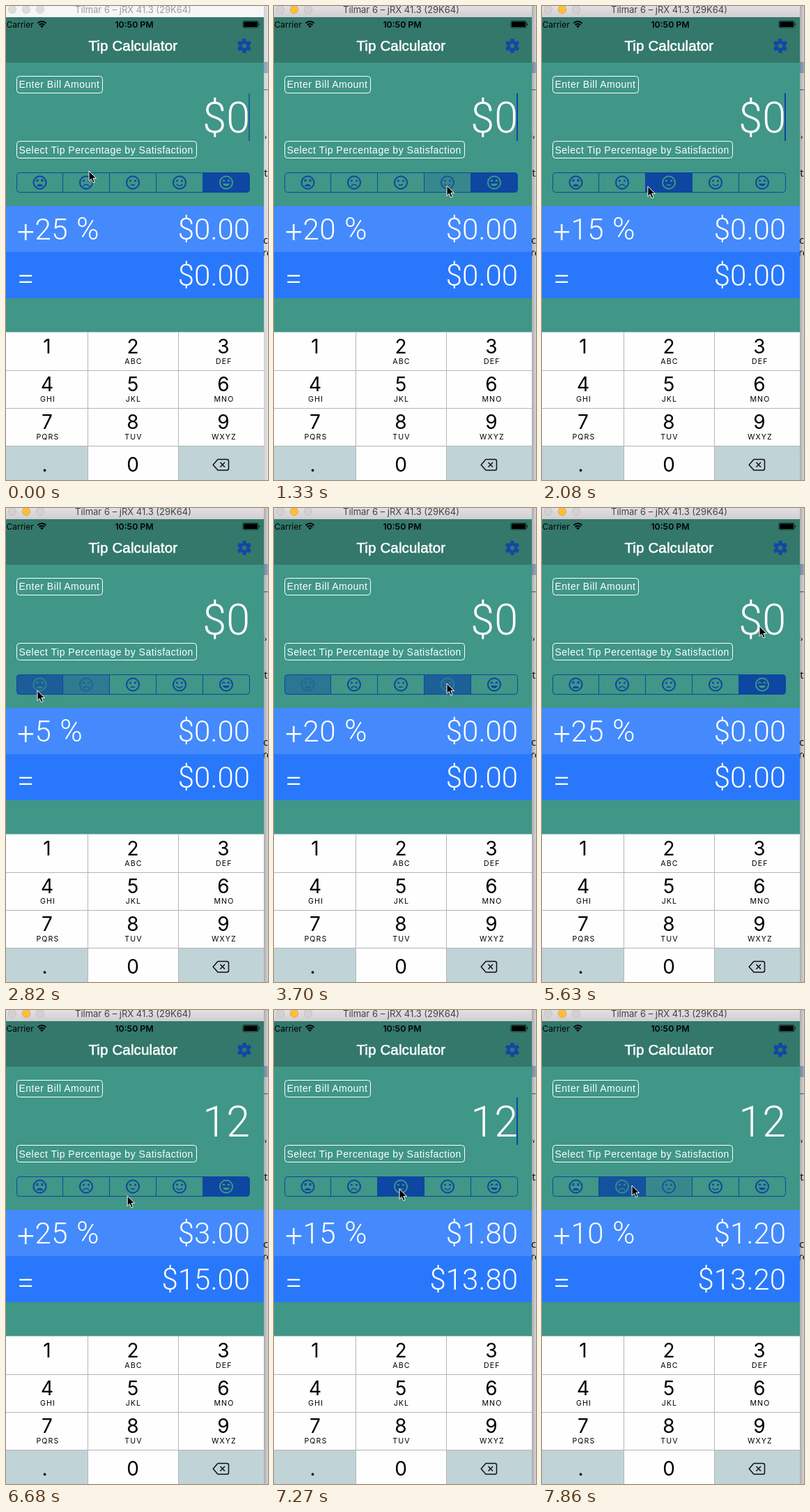
Write an HTML page that moves like this. It is 376 by 678 pixels and loops after 8000 ms.

```html
<!DOCTYPE html>
<html lang="en">
<head>
<meta charset="utf-8">
<title>Tip Calculator</title>
<style>
html, body { margin: 0; width: 100%; height: 100%; overflow: hidden; background: #fff; }
svg { display: block; width: 376px; height: 678px; }
text { white-space: pre; }
.ui { font-family: Inter, Roboto, sans-serif; }
.label { font: 14px "Liberation Sans", Arial, sans-serif; letter-spacing: .5px; fill: #fff; }
.light { font-family: Roboto, "Liberation Sans", sans-serif; font-weight: 300; fill: #fff; }
.mid { text-anchor: middle; }
.end { text-anchor: end; }
.row { font-size: 42px; }
.page { font: 15px "Open Sans", "Noto Sans", sans-serif; fill: #111; }
.sub { font-size: 10.6px; letter-spacing: 1.1px; }
</style>
</head>
<body>
<svg viewBox="0 0 376 678" xmlns="http://www.w3.org/2000/svg">
  <defs>
    <linearGradient id="bar" x2="0" y2="1">
      <stop stop-color="#e2e0e2"/><stop offset="1" stop-color="#d0ced0"/>
    </linearGradient>
    <linearGradient id="shade">
      <stop stop-color="#000" stop-opacity=".3"/><stop offset="1" stop-color="#000" stop-opacity=".12"/>
    </linearGradient>
  </defs>

  <!-- page behind the window -->
  <path fill="#f4f2f4" d="M369 0h7v678h-7z"/>
  <path fill="#a9bdd8" d="M369 80h7v16h-7z"/>
  <path fill="#7d97bb" d="M369 119h7v1.500h-7z"/>
  <g class="page">
    <text x="364" y="188">s,</text><text x="362" y="244">at</text>
    <text x="369" y="340">co</text><text x="368" y="358">re</text>
  </g>
  <path id="shadow" fill="url(#shade)" d="M370 0h6v678h-6z"/>

  <!-- title bar -->
  <path id="titleBar" d="M0 0h370v16H0z"/>
  <g id="lights" stroke-width=".8">
    <circle cx="9" cy="5" r="5.700"/><circle cx="29" cy="5" r="5.700"/><circle cx="49" cy="5" r="5.700"/>
  </g>
  <text id="title" class="ui mid" x="182.500" y="10" font-size="13">Tilmar 6 – jRX 41.3 (29K64)</text>

  <!-- app -->
  <path fill="#409687" d="M0 16h370v662H0z"/>
  <path fill="#33786b" d="M0 16h370v64.500H0z"/>
  <path fill="#2f6f64" d="M0 80h370v.7H0z"/>
  <text class="ui" x="0.500" y="31" font-size="12">Carrier</text>
  <g fill="none" stroke="#000" stroke-width="1.900">
    <path d="M45.500 24.700Q51.500 19.500 57.500 24.700M47.700 27.200Q51.500 24 55.300 27.200"/>
    <path fill="#000" stroke="none" d="M49 28.600Q51.500 26.800 54 28.600L51.500 31.200z"/>
  </g>
  <text class="ui mid" x="184" y="31" font-size="12.300" font-weight="600">10:50 PM</text>
  <rect x="339.800" y="21.500" width="22.400" height="9.500" rx="2" fill="none" stroke="#000" stroke-width=".6"/>
  <rect x="341" y="22.500" width="20" height="7.500" rx="1"/>
  <path d="M363 24.500q2 1.700 0 3.500z"/>
  <text class="mid" x="182.300" y="64" fill="#fff" stroke="#fff" stroke-width=".6" font-size="20.500" letter-spacing=".15" font-family="'Liberation Sans', Arial, sans-serif">Tip Calculator</text>
  <g id="gear" transform="translate(342 57)" fill="#1148a5"></g>

  <g fill="none" stroke="#fff">
    <rect x="15.500" y="100.500" width="123" height="24" rx="4"/>
    <rect x="15.500" y="193.500" width="258" height="24" rx="4"/>
  </g>
  <text class="label" x="18.500" y="117">Enter Bill Amount</text>
  <text class="label" x="18.500" y="210.500">Select Tip Percentage by Satisfaction</text>
  <text id="bill" class="light end" x="350" y="181" font-size="61"></text>
  <path id="caret" fill="#0d47a1" d="M348 125h2v68h-2z"/>

  <g id="segments"></g>
  <rect x="15.500" y="238.500" width="334" height="28" rx="4" fill="none" stroke="#0d47a1"/>

  <path fill="#448afc" d="M0 286h370v66H0z"/>
  <path fill="#2978fb" d="M0 352h370v66H0z"/>
  <g class="light row">
    <text x="16" y="338" font-size="44">+</text>
    <text x="41.500" y="334" letter-spacing=".4"><tspan id="percent"></tspan><tspan dx="1.500" font-size="44">%</tspan></text>
    <text id="tip" class="end" x="350" y="334"></text>
    <text x="16" y="405" font-size="44">=</text>
    <text id="total" class="end" x="350" y="400"></text>
  </g>

  <!-- keypad -->
  <path fill="#fefefe" d="M0 466.500h370V678H0z"/>
  <path fill="#c0d3d7" d="M0 629h117v49H0zM248 629h122v49H248z"/>
  <path fill="none" stroke="#b3b6b7" d="M0 521.500H370M0 575.500H370M0 629.500H370M117.500 467V678M247.500 467V678"/>
  <g id="keys" class="ui mid"></g>
  <g fill="none" stroke="#111" stroke-width="1.500">
    <path stroke-linejoin="round" d="M304 648.500h13q2.500 0 2.500 2.500v10.500q0 2.500-2.500 2.500h-13l-6.800-7.800z"/>
    <path d="M307.500 652.800l6.500 6.800m0-6.800l-6.500 6.800"/>
  </g>

  <path id="cursor" stroke="#fff" stroke-width="1" d="M0 0V14.500L3.300 11.400L5.600 16.800L8.200 15.700L5.900 10.400H10.500Z"/>
</svg>

<script>
const $ = id => document.getElementById(id);
const LOOP = 8000, STEP = 148.3, LAST = 53;
const DARK = [13, 71, 161], TEAL = [64, 150, 135];

// time, chosen segment, fade length
const picks = [
  [-999, 4], [1290, 3], [1780, 2], [2225, 1], [2640, 0],
  [3540, 3], [4800, 4], [6950, 2], [7715, 1, 170]
];
// time, x, y of the pointer tip
const path = [
  [0, 119, 236], [740, 248, 249], [890, 248, 249], [1040, 248, 257], [1490, 248, 257],
  [1780, 186, 258], [1930, 184, 258], [2230, 118, 258], [2380, 114, 259], [2670, 45, 261],
  [2970, 45, 261], [3260, 248, 251], [4290, 248, 251], [4600, 267, 249], [4770, 308, 254],
  [5190, 314, 252], [5630, 312, 169], [6240, 312, 169], [6674, 174, 266], [6830, 180, 256],
  [7270, 180, 256], [7560, 129, 251]
];

const eyes = '<circle cx="-3.5" cy="-2.500" r="1.500"/><circle cx="3.500" cy="-2.500" r="1.500"/>';
const line = d => `<path fill="none" stroke="currentColor" stroke-width="1.600" d="${d}"/>`;
const faces = [
  line('M-5-4.500l3 3m0-3l-3 3M2-4.500l3 3m0-3l-3 3') + '<path d="M-4.800 5.500A5.200 5.200 0 0 1 4.800 5.500z"/>',
  eyes + line('M-4.400 5.300Q0 .2 4.400 5.300'),
  eyes + line('M-3 3.500H3'),
  eyes + line('M-4.400 2.200Q0 7.300 4.400 2.200'),
  line('M-5.200-1.600l1.700-2l1.700 2M1.800-1.600l1.700-2l1.700 2') + '<path d="M-5 1.500H5A5.300 5.300 0 0 1-5 1.500z"/>'
];

$('gear').innerHTML = '<circle r="5.400" fill="none" stroke="#1148a5" stroke-width="4.200"/>' +
  [0, 60, 120, 180, 240, 300].map(a =>
    `<path transform="rotate(${a})" d="M-3.200-6L-2.300-10.300H2.300L3.200-6z"/>`).join('');

const edge = i => Math.floor(15 + 66.8 * i) + .5;
$('segments').innerHTML = faces.map((face, i) => {
  const x = edge(i), r = edge(i + 1);
  const shape = i === 0 ? `M${r} 238.500V266.500H19.500q-4 0-4-4V242.500q0-4 4-4z`
    : i === 4 ? `M${x} 238.500V266.500H345.500q4 0 4-4V242.500q0-4-4-4z`
    : `M${x} 238.500H${r}V266.500H${x}z`;
  return `<g><path fill="#0d47a1" d="${shape}"/>` +
    (i ? `<path stroke="#0d47a1" d="M${x} 238.500V266.500"/>` : '') +
    `<g fill="currentColor" transform="translate(${(x + r) / 2} 252.500)">` +
    `<circle r="9" fill="none" stroke="currentColor" stroke-width="2"/>${face}</g></g>`;
}).join('');
const segments = [...$('segments').children];

const letters = ['', 'ABC', 'DEF', 'GHI', 'JKL', 'MNO', 'PQRS', 'TUV', 'WXYZ'];
const columns = [59, 182, 312];
$('keys').innerHTML = letters.map((sub, i) => {
  const x = columns[i % 3], y = 497 + 54 * Math.floor(i / 3);
  return `<text x="${x}" y="${y}" font-size="28">${i + 1}</text>` +
    `<text class="sub" x="${x + .9}" y="${y + 15}">${sub}</text>`;
}).join('') + '<text x="182" y="666" font-size="28">0</text><text x="55.500" y="666" font-size="28">.</text>';

const clamp = v => Math.max(0, Math.min(1, v));
const money = v => '$' + v.toFixed(2);

function pointer(t) {
  const k = path.findIndex(p => p[0] > t);
  if (k < 0) return path[path.length - 1].slice(1);
  const a = path[k - 1], b = path[k], u = (t - a[0]) / (b[0] - a[0]);
  return [a[1] + (b[1] - a[1]) * u, a[2] + (b[2] - a[2]) * u];
}

function caretAlpha(t) {
  if (t > 5700 && t < 6400) return 1;
  const q = (t + 100) % 1000;
  return Math.min(clamp(q / 150), clamp((680 - q) / 130));
}

function render(t) {
  const active = t > 1030;
  $('titleBar').setAttribute('fill', active ? 'url(#bar)' : '#f6f6f6');
  $('title').setAttribute('fill', active ? '#444' : '#9c9c9c');
  $('shadow').setAttribute('opacity', active ? 1 : .5);
  [...$('lights').children].forEach((c, i) => {
    const lit = active && i === 1;
    c.setAttribute('fill', lit ? '#fdbe3a' : active ? '#d3d1d3' : '#dcdcdc');
    c.setAttribute('stroke', lit ? '#e0a32e' : active ? '#bdbbbd' : '#cdcdcd');
  });

  let n = picks.length - 1;
  while (picks[n][0] > t) n--;
  const [start, now, fade = 250] = picks[n];
  const u = clamp((t - start) / fade), before = n ? picks[n - 1][1] : -1;
  segments.forEach((g, i) => {
    // the old choice lets go a little after the new one lights up
    const level = i === now ? u : i === before ? clamp((1 - u) / .82) : 0;
    g.firstChild.setAttribute('fill-opacity', level);
    g.style.color = `rgb(${DARK.map((c, k) => Math.round(c + (TEAL[k] - c) * level))})`;
  });

  const text = t < 5770 ? '$0' : t < 5920 ? '1' : '12';
  const bill = t < 5770 ? 0 : +text, rate = 5 * (now + 1);
  $('bill').textContent = text;
  $('percent').textContent = `${rate} `;
  $('tip').textContent = money(bill * rate / 100);
  $('total').textContent = money(bill * (1 + rate / 100));
  $('caret').setAttribute('opacity', caretAlpha(t));
  $('cursor').setAttribute('transform', `translate(${pointer(t)})`);
}

// the picture advances in even, hard steps
const origin = performance.now();
function tick() {
  const t = (performance.now() - origin) % LOOP;
  render(Math.min(LAST, Math.floor((t + 15) / STEP)) * STEP);
  requestAnimationFrame(tick);
}
tick();
</script>
</body>
</html>
```
